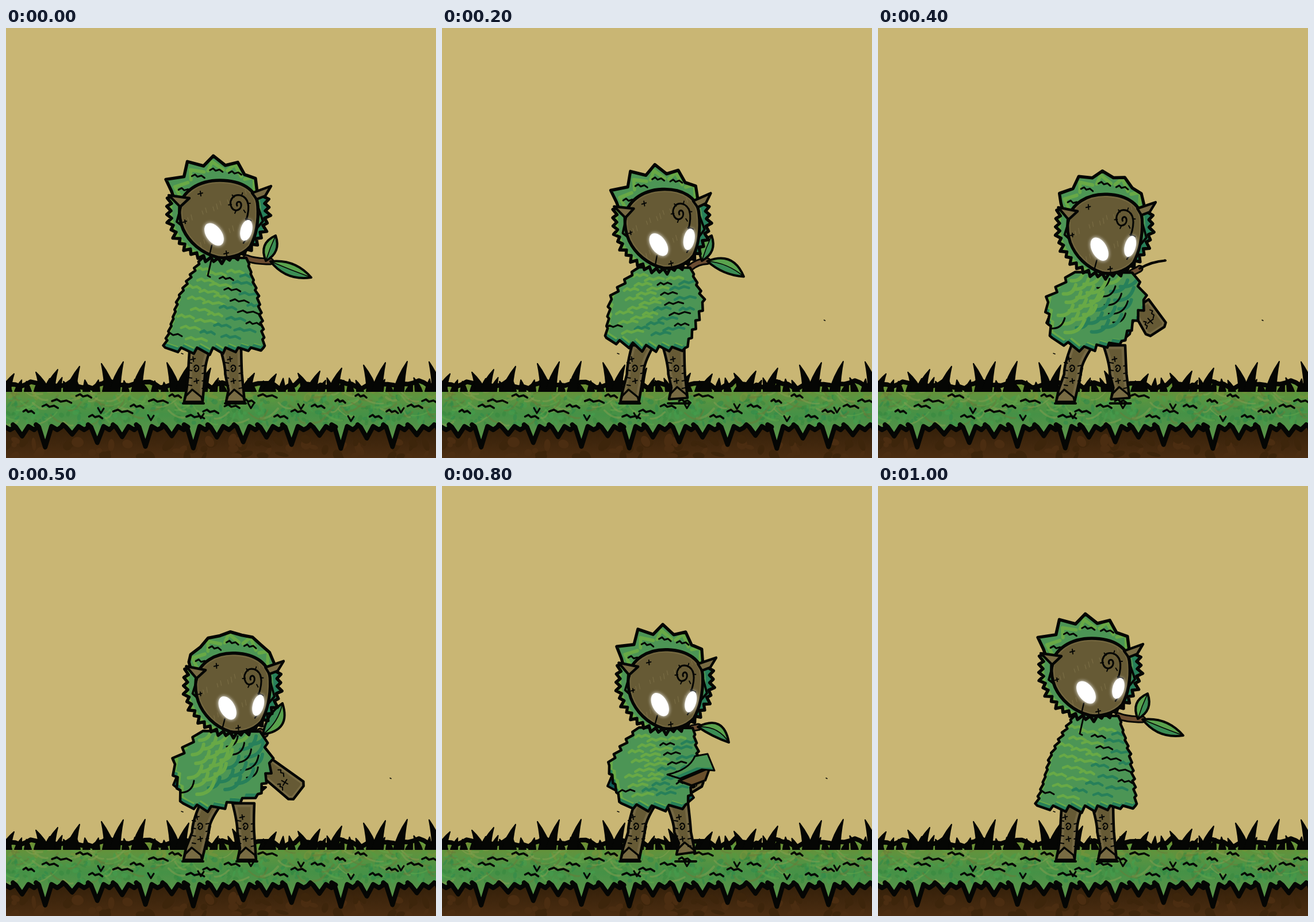
These frames come from a looping animation (748x748 px, 1100 ms). An HTML page with a canvas:

```html
<!DOCTYPE html>
<html lang="en">
<head>
<meta charset="utf-8">
<title>Leaf sprite</title>
<style>
html, body { margin: 0; width: 100%; height: 100%; overflow: hidden; background: #c9b674; }
canvas { display: block; width: 100%; height: 100%; }
</style>
</head>
<body>
<canvas id="stage" width="748" height="748"></canvas>
<script>
const SIZE = 748, STEP = 100;
const INK = '#050604', LEAF = '#4c9555', LIGHT = '#68a946', TEAL = '#27805a', DEEP = '#0d5d58';
const BARK = '#665a35', PALE = '#786b43';
const stage = document.getElementById('stage').getContext('2d');
let g = stage;

// ---------- helpers ----------
const poly = pts => new Path2D('M' + pts.join(' ') + 'Z');
const lerp = (a, b, t) => a + (b - a) * t;
const between = (p, q, t) => [lerp(p[0], q[0], t), lerp(p[1], q[1], t)];
const shift = (p, x, y) => [p[0] + x, p[1] + y];

function ink(path, fill, width = 5, color = INK) {
  if (fill) { g.fillStyle = fill; g.fill(path); }
  if (width) { g.strokeStyle = color; g.lineWidth = width; g.stroke(path); }
}
const line = (d, width = 3, color) => ink(new Path2D(d), null, width, color);

function inside(path, draw) {
  g.save();
  g.clip(path);
  draw();
  g.restore();
}

const squiggle = (x, y, len, width, color) =>
  line(`M${x},${y}l${len * .25},-3l${len * .2},4l${len * .3},-2l${len * .25},4`, width, color);
const plus = (x, y, r = 4) => line(`M${x - r},${y + 1}l${2 * r},-2M${x},${y - r}l1,${2 * r}`, 2);

function randomizer(seed) {
  return () => (seed = (seed * 16807) % 2147483647) / 2147483647;
}

// ---------- scenery ----------
function drawScene() {
  const rnd = randomizer(71);
  const range = (a, b) => lerp(a, b, rnd());

  function spots(n, y0, y1, colors, size) {
    for (let i = 0; i < n; i++) {
      g.fillStyle = colors[i % colors.length];
      g.beginPath();
      g.ellipse(range(0, SIZE), range(y0, y1), size * range(.4, 1.4), size * range(.3, .9), range(0, 3), 0, 7);
      g.fill();
    }
  }

  function blade(tipX, tipY, baseX, half) {
    const baseY = 632, mx = lerp(tipX, baseX, .75), my = lerp(tipY, baseY, .5);
    ink(new Path2D(`M${baseX - half},${baseY}Q${mx - half * .7},${my} ${tipX},${tipY}Q${mx + half * .7},${my} ${baseX + half},${baseY}Z`), INK, 2);
  }

  g.fillStyle = '#c9b674';
  g.fillRect(0, 0, SIZE, SIZE);
  const soil = g.createLinearGradient(0, 700, 0, 748);
  soil.addColorStop(0, '#36210a');
  soil.addColorStop(1, '#4b2d11');
  g.fillStyle = soil;
  g.fillRect(0, 690, SIZE, 58);
  spots(70, 715, 750, ['#3d250b', '#4b2d11'], 10);

  const edge = [];
  for (let x = -20; x < 770; x += 9) edge.push([x, 614 + 9 * Math.abs(Math.sin(x * .047 + 1)) + range(-3, 5)]);
  // hanging tufts, every second one long
  for (let k = 17; k >= -1; k--) {
    const x = 27 + 43 * k + range(-5, 5), tip = k % 2 ? range(720, 732) : range(706, 714);
    edge.push([x + 28, 692 + range(0, 4)], [x + 21, 699], [x + 11, 693], [x, tip], [x - 11, 694], [x - 16, 690]);
  }
  const turf = poly(edge);
  const shade = g.createLinearGradient(0, 615, 0, 700);
  ['#71902f', '#5c9340', '#459146', '#569348'].forEach((c, i) => shade.addColorStop(i / 3, c));
  ink(turf, shade, 0);
  inside(turf, () => {
    g.globalAlpha = .5;
    spots(330, 642, 690, ['#2c8a4d', '#45a04e', '#37873f'], 5);
    spots(100, 617, 648, ['#7f943b', '#549b40'], 7);
    for (let i = 0; i < 130; i++) {
      const dx = range(12, 36) * (rnd() < .5 ? -1 : 1);
      line(`M${range(0, SIZE)},${range(622, 692)}q${dx * .5},2 ${dx},${range(-17, -4)}`, range(2, 4), ['#85a050', '#6a7c38', '#62a64a'][i % 3]);
    }
    g.globalAlpha = 1;
  });
  ink(turf, null, 8);
  for (let x = 4; x < SIZE; x += 17) blade(x + range(-9, 9), range(608, 617), x, 6);
  for (let k = 0; k < 20; k++) {
    const x = 14 + 38 * k, lean = k % 3 === 1 ? -1 : 1;
    blade(x, 580 + 22 * Math.cos((k - 12) / 4) ** 2, x - 15 * lean, 9);
  }
  for (let x = 24; x < SIZE; x += 32) squiggle(x + range(-8, 8), 640 + (x * 7 % 5) * 9, range(16, 34), 3.5);
  for (let x = 160; x < SIZE; x += 87) line(`M${x},${range(645, 675)}l5,9l5,-8`, 3);
}

// ---------- head ----------
const FACE = new Path2D('M302,312C306,284 335,265 372,265C408,265 437,280 438,310C440,335 435,362 425,380C410,397 385,402 368,399C340,392 318,372 308,350C303,338 301,325 302,312Z');
const polar = (deg, r) => [369 + r * Math.sin(deg * Math.PI / 180), 318 - r * Math.cos(deg * Math.PI / 180)];

function hoodShape(spike) {
  const pts = [];
  for (let k = -2; k <= 2; k++) {
    const a = 27 * k - 5;
    pts.push(polar(a, 87 + (9 - 5 * k) * spike), polar(a + 14, 87 - (7 + 2 * k) * spike));
  }
  for (let a = 72; a < 290; a += 9) pts.push(polar(a, 82), polar(a + 5, 90 + 2 * Math.sin(a)));
  return poly(pts);
}

function eye(x, y, rx, ry, turn) {
  g.save();
  g.shadowColor = '#fff';
  g.shadowBlur = 6;
  g.fillStyle = '#fff';
  g.beginPath();
  g.ellipse(x, y, rx, ry, turn, 0, 7);
  g.fill();
  g.restore();
}

function drawHead([x, y, turn, sx, sy], spike) {
  const hood = hoodShape(spike);
  g.save();
  g.translate(x, y);
  g.rotate(turn * Math.PI / 180);
  g.scale(sx, sy);
  g.translate(-370, -333);
  ink(hood, LEAF, 0);
  inside(hood, () => {
    line('M' + polar(-70, 84) + 'A84,84 0 0 0 ' + polar(-160, 84), 8, LIGHT);
    line('M' + polar(75, 80) + 'A80,80 0 0 1 ' + polar(155, 80), 10, TEAL);
    for (let k = -2; k <= 2; k++) {
      const a = 27 * k - 5;
      line('M' + [polar(a - 9, 72), polar(a - 2, 86), polar(a + 12, 72)].join('L'), 6, LIGHT);
    }
  });
  ink(hood, null, 5.5);
  for (let k = -2; k <= 1; k++) squiggle(...shift(polar(27 * k - 5, 71), -8, 0), 22, 3);
  ink(FACE, BARK, 0);
  inside(FACE, () => {
    ink(FACE, null, 10, '#74673f');
    for (let i = 0; i < 22; i++) line(`M${313 + (i * 47) % 116},${280 + (i * 31) % 105}l2,${6 + i % 4}`, 1.3, PALE);
  });
  ink(FACE, null, 5.5);
  ink(new Path2D('M283,291L319,296L303,311Z'), PALE, 4.5);
  ink(new Path2D('M428,287L461,275L451,292L436,298Z'), PALE, 4.5);
  line('M304,312L297,337L306,344M438,310L447,336L435,350', 4);
  line('M418,334C424,314 424,296 408,291C393,288 387,303 393,313C399,322 411,315 409,306C407,299 399,303 402,309', 3.2);
  for (let a = 0; a < 6; a++) line(`M${406 + 14 * Math.cos(a)},${305 + 14 * Math.sin(a)}l${5 * Math.cos(a)},${5 * Math.sin(a)}`, 2);
  line('M358,378l-4,17M413,374l5,-7M417,332l9,3', 2.5);
  plus(338, 288);
  plus(383, 392);
  plus(311, 337, 3);
  eye(362, 359, 13.5, 22, -.62);
  eye(418, 352, 10, 18.5, .25);
  g.restore();
}

// ---------- body ----------
// base, tip, and how far each edge bows away from the chord
function drawLeaf([x, y, tx, ty, a, b]) {
  const len = Math.hypot(tx - x, ty - y), nx = (y - ty) / len, ny = (tx - x) / len;
  const bow = k => `Q${(x + tx) / 2 + nx * k},${(y + ty) / 2 + ny * k} `;
  const rib = bow((a + b) / 2), start = `M${x},${y}`, back = `${tx},${ty}${bow(b)}${x},${y}Z`;
  const shape = new Path2D(start + bow(a) + back);
  ink(shape, '#5aa34d', 0);
  ink(new Path2D(start + rib + back), '#3b8d54', 0);
  ink(shape, null, 4);
  line(start + rib + `${tx},${ty}`, 1.7);
}

function drawLeg([hip, foot, lift]) {
  const top = 552, sole = 650 - lift, knee = lerp(hip, foot, .6), l = foot - 16, r = foot + 16;
  const shape = new Path2D(`M${hip - 19},${top}Q${knee - 14},585 ${knee - 14},602L${l + 4},${sole - 20}L${l},${sole}L${r},${sole - lift / 2}L${knee + 15},602Q${knee + 14},585 ${hip + 19},${top}Z`);
  ink(shape, BARK, 0);
  inside(shape, () => ink(shape, null, 13, '#756843'));
  ink(shape, null, 4.5);
  ink(new Path2D(`M${l},${sole}l3,-10l11,-11l16,13L${r},${sole - lift / 2}Z`), PALE, 3.5);
  line(`M${knee - 4},590c2,-7 11,-2 7,5c-4,6 -9,-1 -4,-3`, 2.2);
  plus(knee - 6, 576);
  plus(knee, 614);
  for (let y = 582; y < 625; y += 13) line(`M${knee - 14},${y}l6,1M${knee + 15},${y + 5}l-5,1`, 1.8);
}

function drawArm([x, y, ex, ey]) {
  const len = Math.hypot(ex - x, ey - y);
  const shape = new Path2D(`M0,-17L${len - 5},-20L${len},-14L${len},15L${len - 7},20L0,17Z`);
  g.save();
  g.translate(x, y);
  g.rotate(Math.atan2(ey - y, ex - x));
  ink(shape, BARK, 0);
  inside(shape, () => ink(shape, null, 11, PALE));
  ink(shape, null, 4.5);
  plus(len * .6, 1, 6);
  squiggle(len * .3, -9, 15, 2);
  squiggle(len * .5, 11, 13, 2);
  g.restore();
}

// grows downward-swept teeth on the outline, longer along the hem
function furry(corners, shag) {
  const pts = [];
  corners.slice(0, -1).forEach((p, i) => {
    const q = corners[i + 1], dx = q[0] - p[0], dy = q[1] - p[1], len = Math.hypot(dx, dy);
    const hem = Math.abs(dx) > Math.abs(dy) && dx > 0;
    const n = Math.max(1, Math.round(len / (hem ? 24 : 14 + 9 * shag))), size = hem ? 11 : 4 + 5 * shag;
    for (let j = 0; j < n; j++) {
      const amp = size * (.8 + .35 * Math.sin(7 * j + 3 * i));
      const tip = between(p, q, (j + (dy < 0 && !hem ? .2 : .8)) / n);
      pts.push(between(p, q, j / n), shift(tip, -dy / len * amp, dx / len * amp));
    }
  });
  return poly([...pts, corners.at(-1)]);
}

function drawCloak(corners, shag) {
  const shape = furry(corners, shag), [neckL, , hemL, , hemR, , neckR] = corners;
  ink(shape, TEAL, 0);
  inside(shape, () => {
    g.translate(0, -8);
    ink(shape, LIGHT, 0);
    g.translate(6, 0);
    ink(shape, LEAF, 0);
    g.translate(-6, 8);
    for (let i = 0; i < 32; i++) {
      const u = (i * .618 + .1) % 1, v = .13 + .8 * i / 32;
      const [x, y] = between(between(neckL, hemL, v), between(neckR, hemR, v), u);
      const black = i % 5 === 4, len = 24 + i % 4 * 4;
      g.save();
      g.translate(x - 12, y);
      g.rotate(-.6 * shag);
      const color = black ? INK : u * .8 + v * .6 > .75 ? TEAL : LIGHT;
      if (shag > .5) line(`M0,0q${len * .6},${len * .4} ${len * 1.1},-4`, black ? 3 : 6, color);
      else squiggle(0, 0, len, black ? 3 : 4.5, color);
      g.restore();
    }
  });
  ink(shape, null, 4.5);
}

function drawSleeve([x, y]) {
  ink(new Path2D(`M${x - 54},${y + 13}l54,-23l-8,22l-24,9Z`), '#6a502c', 4);
  const sleeve = new Path2D(`M${x - 74},${y + 2}Q${x - 36},${y - 6} ${x - 26},${y - 30}L${x - 4},${y - 34}L${x + 8},${y - 5}L${x - 14},${y - 7}L${x - 52},${y + 9}Z`);
  ink(sleeve, LEAF, 0);
  inside(sleeve, () => line(`M${x - 60},${y + 9}l38,-16l30,1`, 7, TEAL));
  ink(sleeve, null, 3);
}

// ---------- poses ----------
// cloak: left flank, left hem, middle hem, right hem, right flank; legs: hip, foot, lift
const SQUASH = [.95, 1.02];
const stand = {
  head: [370, 333, 0, 1, 1], spike: 1, shag: 0, speck: 0,
  cloak: [[302, 468], [277, 556], [360, 556], [448, 556], [437, 470]],
  legs: [[339, 326, 0], [390, 399, 0]],
  leaves: [[460, 406, 531, 434, -20, 22], [452, 405, 469, 361, -23, 20]]
};
const lean = {
  ...stand, head: [373, 343, -7, ...SQUASH], speck: 661,
  cloak: [[292, 474], [274, 552], [350, 552], [436, 560], [440, 490]],
  legs: [[345, 326, 0], [396, 398, 0]]
};
const crouch = {
  head: [394, 357, 2.5, ...SQUASH], spike: 1, shag: .6, speck: 668,
  cloak: [[298, 470], [298, 526], [360, 551], [410, 553], [466, 464]],
  legs: [[354, 327, 0], [409, 424, 9]], arm: [463, 476, 464, 522],
  leaves: [[463, 405, 519, 431, -48, 2]]
};
const strike = {
  head: [394, 360, 2.5, ...SQUASH], spike: .25, shag: 1, speck: 668,
  cloak: [[294, 484], [308, 552], [357, 557], [438, 536], [458, 482]],
  legs: [[357, 325, 0], [413, 419, 0]], arm: [450, 487, 509, 533],
  leaves: [[447, 432, 481, 378, 38, -14]]
};
const lower = {
  ...strike, head: [388, 355, 2.5, ...SQUASH], speck: 670,
  cloak: [[308, 488], [311, 540], [353, 551], [440, 537], [458, 480]],
  legs: [[361, 322, 0], [408, 416, 0]], arm: [449, 495, 477, 551],
  leaves: [[448, 440, 499, 408, 42, 0]]
};
const gather = {
  ...crouch, head: [388, 354, 2.5, ...SQUASH], shag: .3,
  cloak: [[291, 486], [312, 552], [365, 556], [424, 554], [445, 480]],
  arm: [425, 505, 440, 530], sleeve: [466, 500],
  leaves: [[445, 419, 499, 446, -40, 4]]
};

// blends every number two poses share; the rest comes from the first
function mix(a, b) {
  if (b === undefined) return a;
  if (typeof a === 'number') return lerp(a, b, .5);
  if (Array.isArray(a)) return a.map((v, i) => mix(v, b[i]));
  return Object.fromEntries(Object.entries(a).map(([k, v]) => [k, mix(v, b[k])]));
}

const poses = [
  stand, lean, mix(lean, crouch), crouch, mix(strike, crouch), strike,
  lower, mix(lower, gather), gather, mix(lean, gather), stand
];

function drawSprite({ head, spike, shag, speck, cloak, legs, arm, sleeve, leaves }) {
  const [hx, hy] = head, neckL = [343, hy + 66], neckR = [hx + 48, hy + 67];
  const [flankL, hemL, , hemR, flankR] = cloak;
  if (speck) line(`M${speck},508l2,1`, 1.5);
  line('M305,566l3,1', 1.5);
  const twig = `M${neckR}Q${neckR[0] + 14},${leaves[0][1]} ${leaves[0][0]},${leaves[0][1]}`;
  line(twig, 13);
  line(twig, 7, '#6c4d31');
  leaves.forEach(drawLeaf);
  legs.forEach(leg => {
    line(`M${leg[1] - 18},653h36`, 4);
    drawLeg(leg);
  });
  if (arm) {
    ink(poly([hemR, shift(hemR, 14, -12), shift(flankR, -20, 42), flankR]), DEEP, 4);
    ink(poly([shift(flankL, 10, 5), shift(flankL, -3, 36), shift(hemL, 4, -15)]), DEEP, 4);
    drawArm(arm);
  }
  drawCloak([neckL, ...cloak, neckR], shag);
  if (sleeve) drawSleeve(sleeve);
  drawHead(head, spike);
  if (head[3] === 1) line('M357,404l-6,27l4,2', 3);
}

// ---------- playback ----------
const scene = document.createElement('canvas');
scene.width = scene.height = SIZE;
g = scene.getContext('2d');
g.lineJoin = g.lineCap = 'round';
drawScene();
g = stage;
g.lineJoin = g.lineCap = 'round';

function tick() {
  const index = Math.floor(performance.now() / STEP) % poses.length;
  g.drawImage(scene, 0, 0);
  drawSprite(poses[index]);
  requestAnimationFrame(tick);
}
tick();
</script>
</body>
</html>
```
